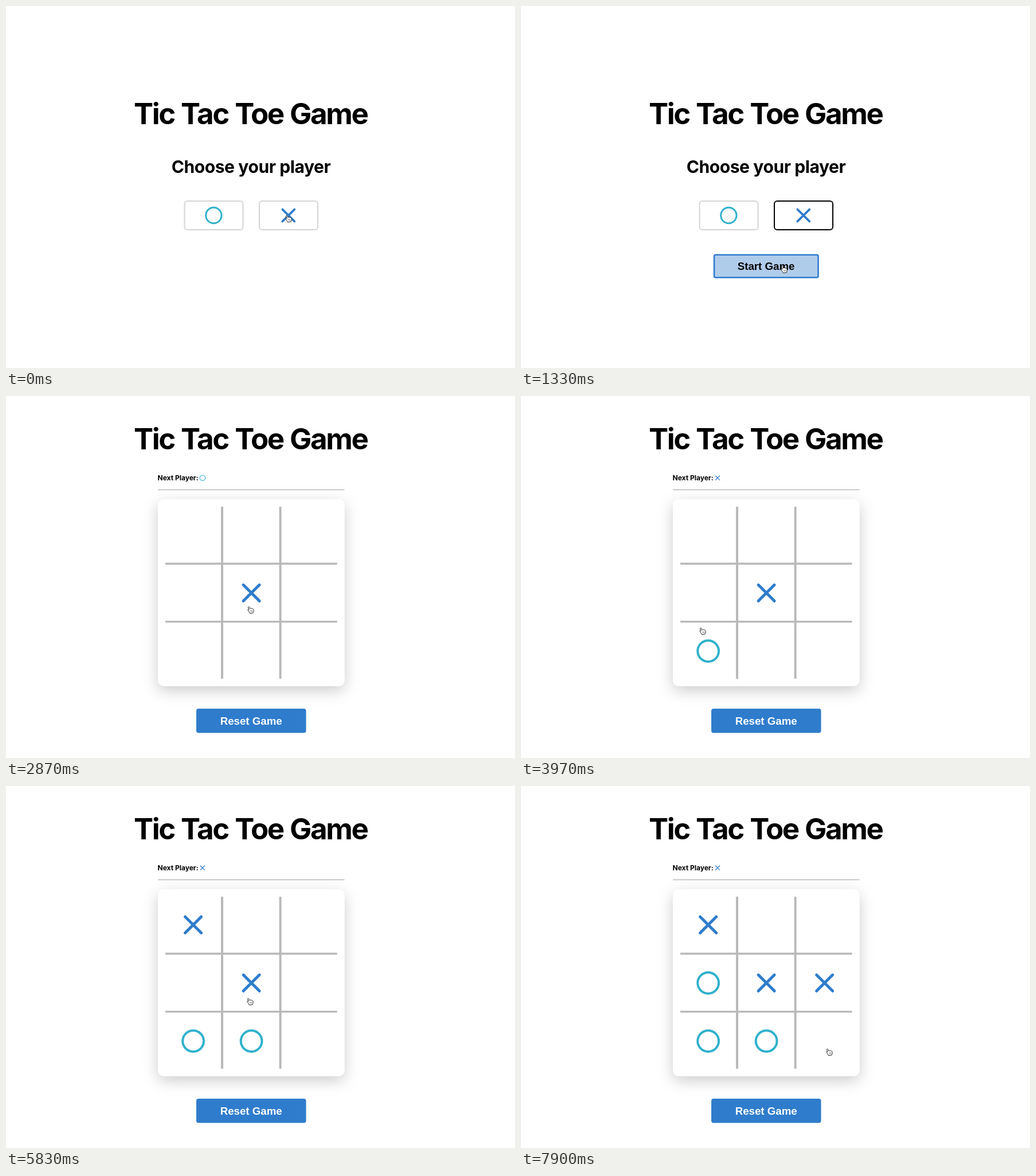
An HTML page for the animation above (8000 ms loop, 888 by 631 pixels).

```html
<!DOCTYPE html>
<html lang="en">
<head>
<meta charset="utf-8">
<title>Tic Tac Toe Game</title>
<style>
  html, body { margin: 0; width: 100%; height: 100%; overflow: hidden; background: #fff; }
  svg { display: block; width: 100vw; height: 100vh; }
  text { text-anchor: middle; font-weight: 700; font-family: Inter, sans-serif; }
  #title { font-size: 51px; letter-spacing: -2.35px; word-spacing: 1.5px; }
  #subtitle { font-size: 30px; letter-spacing: -.4px; }
  #next { font-size: 12px; text-anchor: start; }
  .label { font: 700 18.7px "Liberation Sans", Arial, sans-serif; }
  .choice { fill: #fff; stroke: #d4d4d4; stroke-width: 2; }
  .o, .x { fill: none; stroke-linecap: round; }
  .o { stroke: #30b1cc; stroke-width: 4; }
  .x { stroke: #2f7ccc; stroke-width: 5; }
</style>
</head>
<body>
<svg viewBox="0 0 888 631">
  <defs>
    <circle id="o" class="o" r="18.4"/>
    <path id="x" class="x" d="M-14-14 14 14M14-14-14 14"/>
    <filter id="shadow" x="-20%" y="-20%" width="140%" height="145%">
      <feDropShadow dx="0" dy="8" stdDeviation="13" flood-opacity=".2"/>
    </filter>
  </defs>

  <text id="title" x="426.8" y="205.5">Tic Tac Toe Game</text>

  <g id="menu">
    <text id="subtitle" x="427.5" y="291">Choose your player</text>
    <rect class="choice" x="311.5" y="340" width="102" height="50" rx="5"/>
    <rect class="choice" id="chosen" x="442" y="340" width="102" height="50" rx="5"/>
    <use href="#o" transform="translate(362.3 365) scale(.745)"/>
    <use href="#x" transform="translate(492.8 365) scale(.745)"/>
    <g id="start">
      <rect id="startBox" x="337" y="433.7" width="181.5" height="39.6" rx="2.5" stroke="#2f7ccc" stroke-width="2.6"/>
      <text class="label" x="427.6" y="459.7">Start Game</text>
    </g>
  </g>

  <g id="game">
    <text id="next" x="264.5" y="147">Next Player:</text>
    <use id="turn" transform="translate(342.9 142.7) scale(.26)"/>
    <path d="M265 163.5H590.5" stroke="#a0a0a0"/>
    <rect x="265" y="180" width="325.5" height="325.5" rx="10" fill="#fff" filter="url(#shadow)"/>
    <path d="M377 193V492.7M478.6 193V492.7" stroke="#b9b9b9" stroke-width="4"/>
    <path d="M278 292.3H577.6M278 393.4H577.6" stroke="#b9b9b9" stroke-width="3.4"/>
    <g id="marks"></g>
    <rect x="332" y="545" width="191.5" height="42.3" rx="4" fill="#2f7ccc"/>
    <text class="label" x="427.7" y="572.5" fill="#fff">Reset Game</text>
  </g>

  <g id="cursor" fill="#fff" stroke="#222" stroke-linejoin="round" stroke-linecap="round">
    <path d="M-1.5 5.5C-2.2 3.6-4.2 2-5-.2-5.4-1.6-3.6-1.8-2.8-.6L-4.4-4.2C-4.9-6-2.9-6.3-2.3-4.8L-1.2-2.4C-.6-3.4.6-3.2 1-2.4 1.6-3.2 2.8-2.8 3-2 3.8-2.4 4.6-1.8 4.9-.8 5.4 1 5 2.6 4.3 4.6Z"/>
    <path d="M-.2 1 .6 3M2 .6 2.6 2.6" stroke-width=".7"/>
  </g>
</svg>
<script>
const LOOP = 8000, CHOOSE = 270, BEGIN = 1530;
const $ = id => document.getElementById(id);
const show = (el, on) => el.setAttribute('display', on ? 'inline' : 'none');

// Placed marks: time, column, row; X moves first.
const marks = [
  [2870, 1, 1], [3970, 0, 2], [4570, 0, 0],
  [5530, 1, 2], [6330, 2, 1], [7230, 0, 1]
].map(([time, col, row], i) => {
  const el = document.createElementNS('http://www.w3.org/2000/svg', 'use');
  el.setAttribute('href', i % 2 ? '#o' : '#x');
  el.setAttribute('transform', `translate(${326.6 + col * 101.5} ${242 + row * 101.3})`);
  $('marks').append(el);
  return { time, el };
});

// Pointer moves: start, end, target x, y, and an optional curve control point.
const home = [493, 371];
const moves = [
  [670, 1330, 459, 459.5],
  [1870, 2530, 427, 373],
  [3230, 3770, 317, 410, 350, 544],
  [3990, 4430, 325, 262],
  [4700, 5370, 428, 473],
  [5560, 5830, 426, 376],
  [5830, 6280, 530, 375],
  [6630, 7100, 350, 356, 440, 507],
  [7430, 7900, 538, 464]
];

function pointer(t) {
  let [x, y] = home;
  for (const [from, to, tx, ty, cx = (x + tx) / 2, cy = (y + ty) / 2] of moves) {
    if (t < from) break;
    const p = Math.min(1, (t - from) / (to - from));
    const k = p * p * (3 - 2 * p), m = 1 - k;
    x = m * m * x + 2 * m * k * cx + k * k * tx;
    y = m * m * y + 2 * m * k * cy + k * k * ty;
  }
  return [x, y];
}

function draw(t) {
  const playing = t >= BEGIN, chosen = t >= CHOOSE;
  const [x, y] = pointer(t);
  show($('menu'), !playing);
  show($('game'), playing);
  show($('start'), chosen);
  $('title').setAttribute('y', playing ? 92.5 : 205.5);
  $('chosen').style.stroke = chosen ? '#000' : '';
  $('startBox').setAttribute('fill', y > 433 ? '#b0cceb' : '#fff');
  for (const { time, el } of marks) show(el, t >= time);
  const placed = marks.filter(m => t >= m.time).length;
  $('turn').setAttribute('href', placed % 2 ? '#o' : '#x');
  $('cursor').setAttribute('transform', `translate(${x} ${y})`);
}

const origin = performance.now();
function tick() {
  draw((performance.now() - origin) % LOOP);
  requestAnimationFrame(tick);
}
tick();
</script>
</body>
</html>
```
